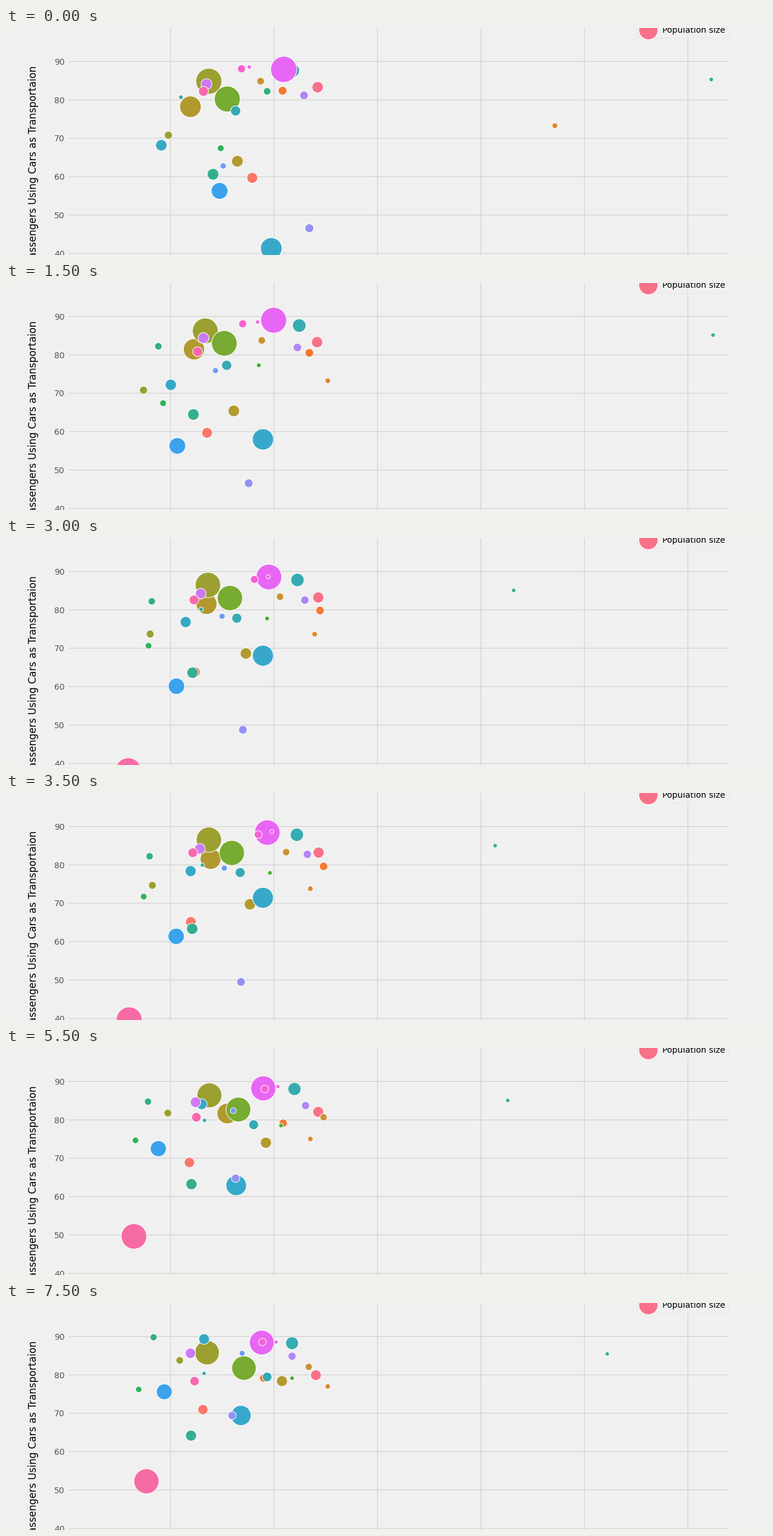
Animation, 1280 px wide and 383 px high, one loop 8 s. Source, as a matplotlib script:

```python
import matplotlib.pyplot as plt
import numpy as np
from matplotlib.animation import FuncAnimation
from matplotlib.patches import Circle, FancyBboxPatch

W, H, DPI = 1280, 383, 100
STEPS, STEP_MS = 16, 500
PX = 72 / DPI  # one pixel in points
BG, GRID, ROSE = "#f0f0f0", "#cbcbcb", "#f97189"

# default times of the waypoints, by how many there are
TIMES = {3: (0, 3, 15), 4: (0, 3, 9, 15), 5: (0, 3, 7, 11, 15)}

plt.rcParams["font.family"] = "DejaVu Sans"
fig = plt.figure(figsize=(W / DPI, H / DPI), dpi=DPI, facecolor=BG)
ax = fig.add_axes([0, 0, 1, 1])
ax.set_xlim(0, W)
ax.set_ylim(H + 0.4, 0.4)
ax.axis("off")
bubbles = []


def disc(x, y, r, color, z):
    return ax.add_patch(Circle((x, y), r, fc=color, ec="white", lw=PX, zorder=z))


def bubble(color, radius, *points, at=None):
    """Bubble that travels through a few waypoints; later ones lie on top."""
    dot = disc(*points[0], radius, color, 3 + len(bubbles) / 100)
    bubbles.append((dot, radius, np.array(points), at or TIMES[len(points)]))


def draw_axes():
    line = dict(color=GRID, lw=PX, zorder=1, snap=False, solid_capstyle="butt")
    for k in range(6):
        x, y = 276.7 + 174.05 * k, 56.9 + 64.75 * k
        ax.plot([x, x], [-5, H + 5], **line)
        ax.plot([105, 1215], [y, y], **line)
        ax.text(99, y, str(90 - 10 * k), size=14 * PX, color="#555555",
                ha="right", va="center_baseline")
    ax.text(51.5, 64.4, "Percentage of Passengers Using Cars as Transportaion",
            size=16.8 * PX, rotation=90, rotation_mode="anchor",
            ha="right", va="baseline")


def draw_legend():
    ax.add_patch(FancyBboxPatch((1065.5, -37), 148, 51.5, boxstyle="round,pad=3",
                                fc=BG, ec="#e4e4e4", alpha=0.8, lw=PX, zorder=5))
    disc(1080.5, 4, 16, ROSE, 6)
    ax.text(1104, 8, "Population size", size=14 * PX, va="baseline", zorder=6)


draw_axes()
draw_legend()

# reds and oranges
bubble(ROSE, 9.5, (524, 100), (523, 100), (527, 101), (521, 122))
bubble("#f8766a", 9, (414, 253), (338, 253), (297, 200), (331, 180))
bubble("#f47932", 7.2, (465, 106), (510, 118), (534, 124), (466, 127), (433, 127))
bubble("#dc8932", 4.7, (923, 165), (541, 165), (497, 160), (541, 141))
bubble("#c99232", 6.3, (428, 90), (430, 97), (471, 100), (534, 117), (509, 108))
# golds and olives
bubble("#b2992e", 18, (310, 133), (316, 112), (400, 110))
bubble("#b29a30", 9.7, (389, 225), (383, 216), (464, 132))
bubble("#9ca031", 21.8, (341, 90), (335, 81), (344, 78), (338, 84))
bubble("#9a9f30", 6.7, (273, 181), (231, 181), (246, 156), (272, 110), (292, 97))
# greens
bubble("#77ab31", 21.7, (372, 120), (367, 102), (386, 101), (400, 110))
bubble("#49ae31", 3.9, (386, 139), (425, 139), (481, 127))
bubble("#31b25b", 5.6, (361, 203), (264, 203), (215, 161), (223, 146))
bubble("#32b07c", 6.2, (439, 107), (256, 107), (234, 107), (248, 58))
bubble("#34ae91", 9.7, (348, 247), (315, 222), (312, 233), (311, 224))
bubble("#33ad97", 3.7, (1186, 87), (1189, 88), (885, 88), (760, 90), (1011, 86),
       at=(0, 3, 5, 9, 15))
# teals and blues
bubble("#36abae", 3.7, (294, 117), (322, 117), (334, 124), (333, 119))
bubble("#36abb0", 11.4, (482, 72), (493, 72), (481, 68))
bubble("#35aab3", 8.5, (386, 140), (371, 139), (439, 125))
bubble("#37a9c6", 9.5, (261, 198), (277, 172), (327, 112), (333, 61))
bubble("#38a8ca", 18, (446, 372), (432, 264), (432, 177), (387, 232), (395, 190))
bubble("#3ba3ec", 14, (359, 275), (288, 275), (286, 242), (256, 170), (266, 150))
bubble("#6e9bf4", 5.1, (365, 233), (352, 148), (397, 85))
# violets and pinks
bubble("#9591f4", 7.3, (510, 338), (408, 338), (395, 319), (386, 220), (380, 190))
bubble("#b186f4", 7.1, (501, 114), (490, 109), (515, 101), (481, 90))
bubble("#cc7af4", 9.2, (337, 95), (332, 93), (323, 95), (310, 85))
bubble("#e866f4", 22, (467, 70), (450, 63), (434, 69), (430, 67))
bubble("#f361ea", 3.5, (409, 66), (423, 66), (459, 65), (454, 66))
bubble("#f562d4", 6.7, (396, 69), (398, 69), (437, 71), (431, 66))
bubble("#f769ad", 8.3, (332, 107), (322, 116), (314, 101), (320, 117), (317, 132))
bubble("#f76ba5", 22.4, (200, 450), (204, 403), (210, 363), (215, 318), (236, 301),
       at=(0, 5, 9, 11, 15))


def update(i):
    # most of the opening shift falls on the first step
    t = np.interp(i, (0, 1, 3, 15), (0, 2.1, 3, 15))
    for dot, radius, points, times in bubbles:
        dot.set_center([np.interp(t, times, axis) + 0.2 for axis in points.T])
        dot.set_radius(radius * (1 - 0.06 * i / (STEPS - 1)))
    return [b[0] for b in bubbles]


anim = FuncAnimation(fig, update, frames=STEPS, interval=STEP_MS,
                     repeat=True, repeat_delay=0, blit=False)
plt.show()
```
